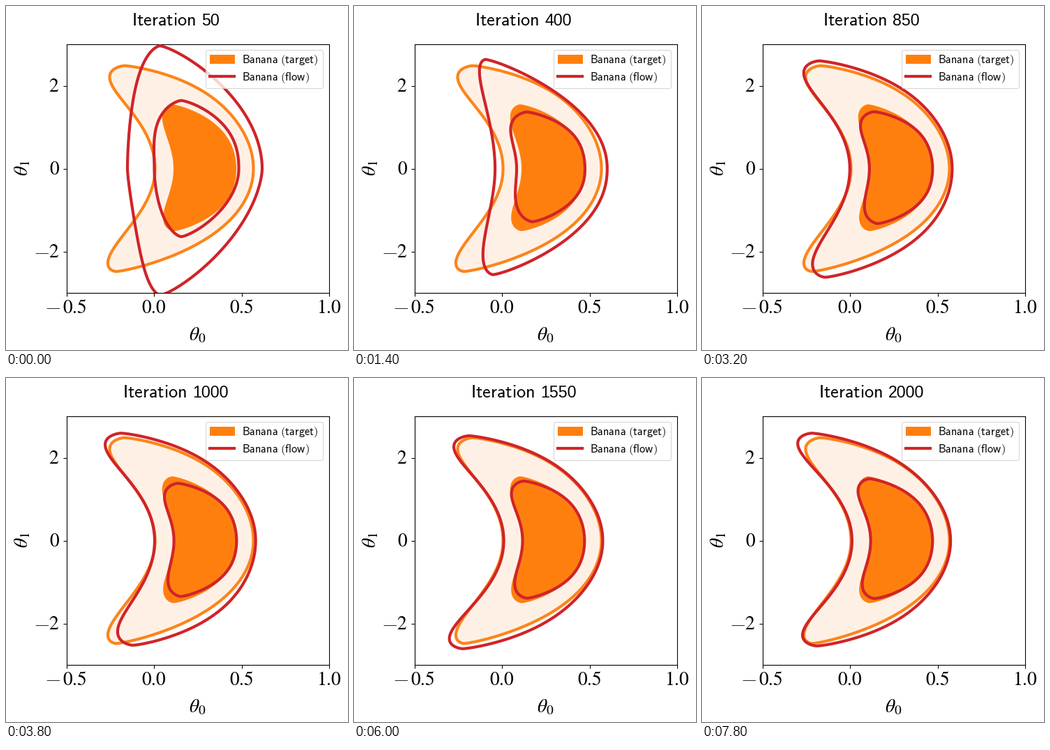
Write a matplotlib script that moves like this. It is 490 px wide and 494 px high and loops after 8 s.

```python
import numpy as np
import matplotlib.pyplot as plt
from matplotlib.animation import FuncAnimation
from matplotlib.patches import FancyBboxPatch, Polygon, Rectangle

W, H, DPI = 490, 494, 100
LEFT, RIGHT, TOP, BOTTOM = 87.0, 463.0, 55.5, 412.0
MID = (TOP + BOTTOM) / 2
FRAMES, INTERVAL, STEP = 40, 200, 50
BACK, PALE, FILL = "white", "#fff0e6", "#ff7f0e"
ORANGE, RED = "#fc851a", "#d02428"
LINE = 3.0
EM, DIGIT = 26, 12.9
KEYS = (50, 400, 650, 1000, 1350, 1750, 2000)


def banana(centre, half, up, down, n=600):
    """Bent oval: up and down hold each arm's (reach, lean, power)."""
    t = np.linspace(0, 2 * np.pi, n, endpoint=False)
    s = np.sin(t)
    reach, lean, power = (np.where(s < 0, u, d) for u, d in zip(up, down))
    v = reach * s
    width = half * (1 - np.abs(s) ** power) ** 0.7
    x = centre - lean * v**2 + np.sign(np.cos(t)) * width
    return np.column_stack([x, MID + v])


def settle(start, end, tau, i):
    """Exponential approach of a fit parameter to its final value."""
    return end + (start - end) * np.exp(-(i - STEP) / tau)


def ease(start, end, i0, i1, i):
    k = np.clip((i - i0) / (i1 - i0), 0, 1)
    return start + (end - start) * k * k * (3 - 2 * k)


def outer_ring(i):
    # The arms wander while training; the body settles steadily.
    up = (np.interp(i, KEYS, (176.5, 157, 155.5, 154.5, 148.5, 153, 154.5)),
          settle(1.6e-3, 5.4e-3, 400, i),
          ease(1.9, 6.9, 300, 1000, i))
    down = (np.interp(i, KEYS, (181.5, 152, 163.5, 150, 156, 154, 151)),
            np.interp(i, KEYS, np.array([15, 36, 43, 46, 55, 53, 53]) * 1e-4),
            ease(1.5, 6.6, 0, 1400, i))
    return banana(settle(270.5, 285.5, 220, i), settle(96.5, 70.5, 360, i),
                  up, down)


def inner_ring(i):
    up = (np.interp(i, KEYS, (98, 81.5, 81, 82.5, 84.5, 87, 89)),
          settle(2.3e-3, 5.8e-3, 200, i),
          settle(2.8, 4.8, 350, i))
    down = (np.interp(i, KEYS, (97.5, 76, 77, 80, 82.5, 82.5, 83)),
            settle(2.3e-3, 5.6e-3, 300, i),
            settle(1.9, 4.4, 700, i))
    return banana(settle(273, 286, 300, i), settle(60.5, 44.3, 280, i),
                  up, down)


def label(x, y, text, size, ha="center", font="stix", **kw):
    return fig.text(x / W, 1 - y / H, text, fontsize=size, ha=ha,
                    va=kw.pop("va", "baseline"), math_fontfamily=font, **kw)


def sans(text):
    return r"$\mathsf{" + text.replace(" ", r"\ ") + "}$"


fig = plt.figure(figsize=(W / DPI, H / DPI), dpi=DPI, facecolor=BACK)
ax = fig.add_axes([LEFT / W, 1 - BOTTOM / H, (RIGHT - LEFT) / W,
                   (BOTTOM - TOP) / H], facecolor=BACK)
ax.set_xlim(LEFT, RIGHT)
ax.set_ylim(BOTTOM, TOP)

# Ticks and axis labels
xs = np.linspace(LEFT, RIGHT, 4)
ys = MID + (BOTTOM - TOP) / 3 * np.array([-1, 0, 1])
ax.set_xticks(xs, [""] * 4)
ax.set_yticks(ys, [""] * 3)
for x, text in zip(xs + [11, -0.5, -0.5, -0.5], ("0.5", "0.0", "0.5", "1.0")):
    label(x, 441, f"${text}$", 19.8)
for y, text in zip(ys, "202"):
    label(76.5, y + 8.5, f"${text}$", 19.8, ha="right")
for x, y in ((67, 440), (51, ys[2] + 8)):
    label(x, y, "$-$", 22, font="cm")
label(274, 480, r"$\theta_0$", 19.8)
label(23.5, 232.5, r"$\theta_1$", 19.8, va="center", rotation=90)

word = label(0, 28.5, sans("Iteration"), 18.8, ha="left", font="cm")
count = label(0, 28.5, "", 16.7, ha="left", family="Liberation Sans")

# Contours
target_outer = banana(284, 70.5, (148, 5.2e-3, 6.5), (147.5, 5.8e-3, 4.5))
target_inner = banana(285, 45, (92.5, 5.5e-3, 4), (89.5, 5.6e-3, 4))
ax.add_patch(Polygon(target_outer, fc=PALE, ec=ORANGE, lw=LINE, zorder=1))
ax.add_patch(Polygon(target_inner, fc=FILL, ec="none", zorder=2))
rings = [ax.add_patch(Polygon(make(STEP), fc="none", ec=RED, lw=LINE,
                              joinstyle="round", zorder=3))
         for make in (outer_ring, inner_ring)]

# Legend
ax.add_patch(FancyBboxPatch((289.5, 66.5), 162, 49,
                            boxstyle="round,pad=3,rounding_size=3", fc=BACK,
                            ec="#cccccc", lw=0.8, alpha=0.8, zorder=5))
ax.add_patch(Rectangle((291.5, 70), 36, 13, fc=FILL, ec="none", zorder=6))
ax.plot([292, 327], [101, 101], color=RED, lw=LINE, zorder=6)
for y, text in ((82, "Banana (target)"), (107, "Banana (flow)")):
    label(337.5, y, sans(text), 11.7, ha="left", font="cm")


def draw(frame):
    i = STEP * (frame + 1)
    for ring, make in zip(rings, (outer_ring, inner_ring)):
        ring.set_xy(make(i))
    digits = str(i)
    lead = 3.85 * EM
    x = 242.5 - (lead + DIGIT * len(digits)) / 2
    word.set_x(x / W)
    count.set_x((x + lead) / W)
    count.set_text(digits)
    return [*rings, word, count]


anim = FuncAnimation(fig, draw, frames=FRAMES, interval=INTERVAL,
                     repeat=True, repeat_delay=0, blit=False)
plt.show()
```
